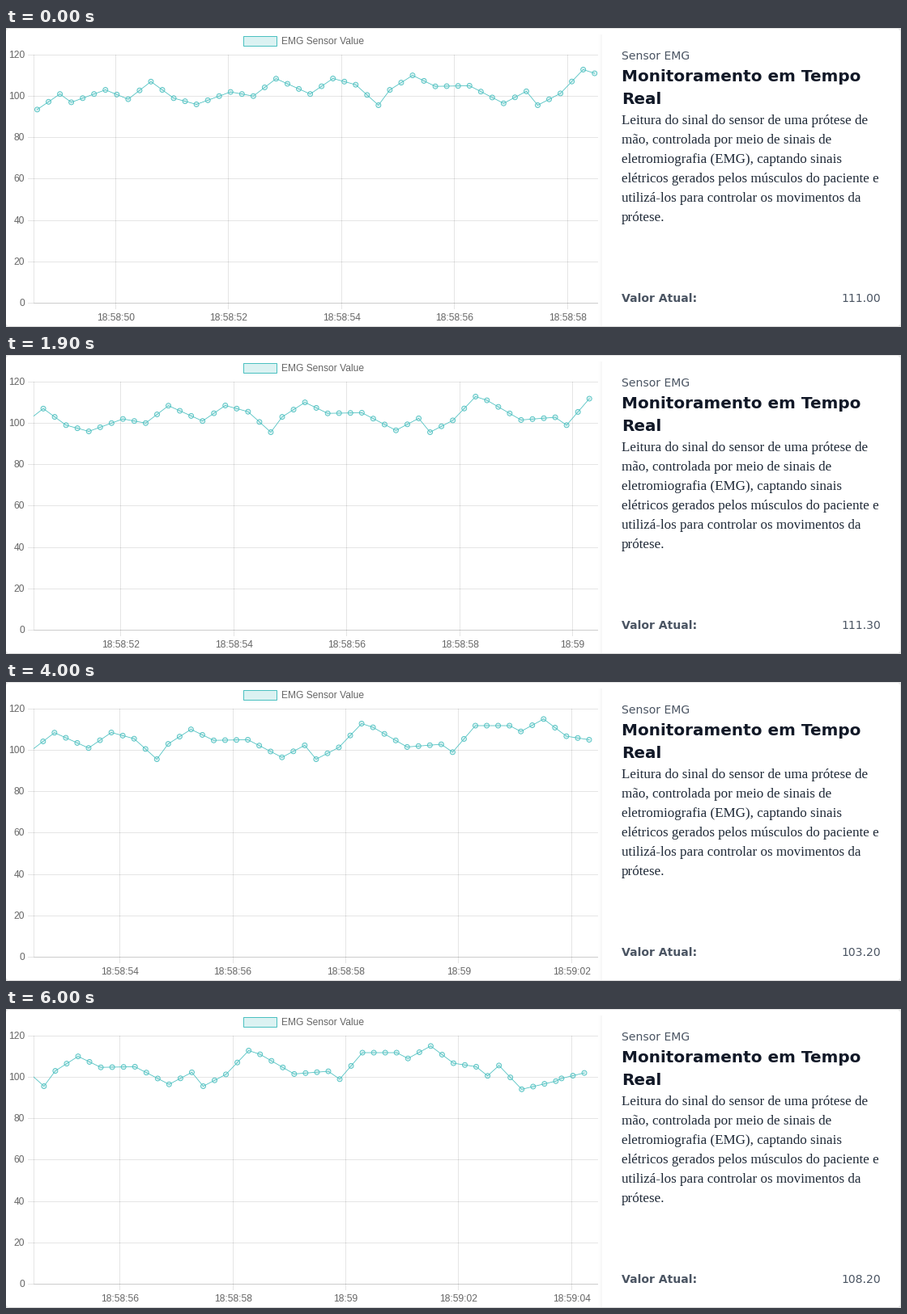
A matplotlib script that plays this animation: 1105 px wide and 370 px high, repeating every 6.1 s.

```python
import matplotlib.pyplot as plt
import numpy as np
from matplotlib.animation import FuncAnimation
from matplotlib.patches import FancyBboxPatch, Rectangle

W, H, DPI = 1105, 370, 100
PX = 72 / DPI                      # points per pixel
FRAMES, INTERVAL = 61, 100
LEFT, RIGHT, BASE = 34, 731, 340.5
UNIT = 2.5625                      # pixels per sensor unit
SECOND = 69.7                      # pixels per second
STEP = 14.045                      # pixels per sample
NOW = 728                          # newest samples enter here
STALL = 2500                       # the scroll skips one frame here
TEAL, GREY, SLATE = "#4bc0c0", "#666666", "#4b5563"

# Turning points of the signal (sample, value); straight runs in between
TURNS = [(0, 93.5), (2, 101), (3, 97), (6, 103), (8, 98.5), (10, 107),
         (12, 99), (14, 96), (17, 102), (19, 100), (21, 108.4), (24, 101),
         (26, 108.5), (28, 105.5), (30, 95.6), (31, 103), (33, 110),
         (35, 104.7), (38, 105), (41, 96.5), (43, 102.3), (44, 95.6),
         (46, 101.3), (48, 112.8), (49, 111), (52, 101.5), (55, 102.8),
         (56, 99), (58, 111.8), (61, 111.8), (62, 109), (64, 115),
         (66, 106.7), (68, 105), (69, 100.6), (70, 105.6), (72, 94.1),
         (78, 102)]
# Clock (ms without the stall), scroll (px), reading
KEYS = [(0, 0, 111), (900, 63, 106.4), (1900, 132.9, 111.3),
        (3100, 218.9, 111.3), (3900, 273.6, 103.2), (4700, 326.7, 94.1),
        (5900, 413, 108.2)]
clock, scroll, reading = zip(*KEYS)

index = np.arange(79)
xs = 38.5 + STEP * index - STEP / 2 * (index > 75)   # one early sample
ys = BASE - UNIT * np.interp(index, *zip(*TURNS))

fig = plt.figure(figsize=(W / DPI, H / DPI), dpi=DPI, facecolor="#e3e3e3")


def layer(x0, x1):
    ax = fig.add_axes([x0 / W, 0, (x1 - x0) / W, 1])
    ax.set(xlim=(x0, x1), ylim=(H, 0), autoscale_on=False)
    ax.axis("off")
    return ax


def write(ax, x, y, s, size, color, font="DejaVu Sans", **kw):
    return ax.text(x, y, s, fontsize=size * PX, color=color, family=font,
                   va="baseline", **kw)


def rule(ax, x, y):
    return ax.plot(x, y, color="black", alpha=0.1, lw=PX, snap=False,
                   solid_capstyle="butt")[0]


def crisp(v):
    return np.floor(v) + 0.5


page = layer(0, W)
chart = layer(LEFT, RIGHT)

# Card
page.add_patch(FancyBboxPatch((0, 1), W - 1, H - 2, fc="white", ec="none",
                              boxstyle="round,pad=0,rounding_size=4"))
page.plot([4, W - 4], [369.5, 369.5], color="#d6d6d6", lw=PX, snap=False)
shade = np.zeros((1, 8, 4))
shade[..., 3] = 0.035 * np.linspace(0, 1, 8) ** 2
page.imshow(shade, extent=(728, 736, 369, 8), aspect="auto", zorder=4)
page.set(xlim=(0, W), ylim=(H, 0))

# Axes and legend
for value in range(0, 121, 20):
    y = crisp(BASE - UNIT * value)
    rule(page, [27, RIGHT], [y, y])
    write(page, 23, y + 3.5, str(value), 12, GREY, "Liberation Sans",
          ha="right")
rule(page, [LEFT, RIGHT], [BASE, BASE])
rule(page, [34.5, 34.5], [33, 340])
page.add_patch(Rectangle((293.5, 10.5), 41, 12, fc="#dbf2f2", ec=TEAL,
                         lw=PX, snap=False))
write(page, 340, 20, "EMG Sensor Value", 12, GREY, "Liberation Sans")

# Side panel
write(page, 760, 39, "Sensor EMG", 14, SLATE)
for i, line in enumerate(["Monitoramento em Tempo", "Real"]):
    write(page, 760, 66 + 28 * i, line, 20, "#111827", weight="bold")
BODY = ["Leitura do sinal do sensor de uma prótese de",
        "mão, controlada por meio de sinais de",
        "eletromiografia (EMG), captando sinais",
        "elétricos gerados pelos músculos do paciente e",
        "utilizá-los para controlar os movimentos da",
        "prótese."]
for i, line in enumerate(BODY):
    write(page, 760, 119 + 24 * i, line, 17.05, "#1f2937", "Liberation Serif")
write(page, 760, 339, "Valor Atual:", 14, SLATE, weight="bold")
readout = write(page, 1080, 339, "", 14, SLATE, ha="right")


def clock_name(sec):
    minute, sec = 58 + sec // 60, sec % 60
    return f"18:{minute}:{sec:02d}" if sec else f"18:{minute}"


# Moving parts
ticks = []
for sec in range(48, 68, 2):
    label = write(chart, 0, 362, clock_name(sec), 12, GREY,
                  "Liberation Sans", ha="center", clip_on=True)
    ticks.append((135.5 + (sec - 50) * SECOND,
                  rule(chart, [0, 0], [33, 348]), label))
curve, = chart.plot([], [], color=TEAL, lw=0.8 * PX, zorder=3)
dots = chart.scatter(xs, ys, s=np.full(len(xs), (6 * PX) ** 2), lw=0.85 * PX,
                     fc=(0.294, 0.753, 0.753, 0.2), ec=TEAL, zorder=5,
                     clip_on=False)


def update(frame):
    t = frame * INTERVAL
    t -= INTERVAL * (t >= STALL)
    shift = np.interp(t, clock, scroll)

    for x0, line, label in ticks:
        x = x0 - shift
        line.set_xdata([crisp(x)] * 2)
        line.set_visible(LEFT <= x <= RIGHT)
        label.set_x(x)
        label.set_visible(LEFT - 30 < x < RIGHT + 30)

    x = xs - shift
    seen = x <= NOW
    curve.set_data(x[seen], ys[seen])
    inside = seen & (x >= LEFT - 0.5)
    dots.set_offsets(np.column_stack([x[inside], ys[inside]]))
    readout.set_text(f"{np.interp(t, clock, reading):.1f}0")
    return curve, dots, readout


anim = FuncAnimation(fig, update, frames=FRAMES, interval=INTERVAL,
                     repeat=True, repeat_delay=0, blit=False)
plt.show()
```
